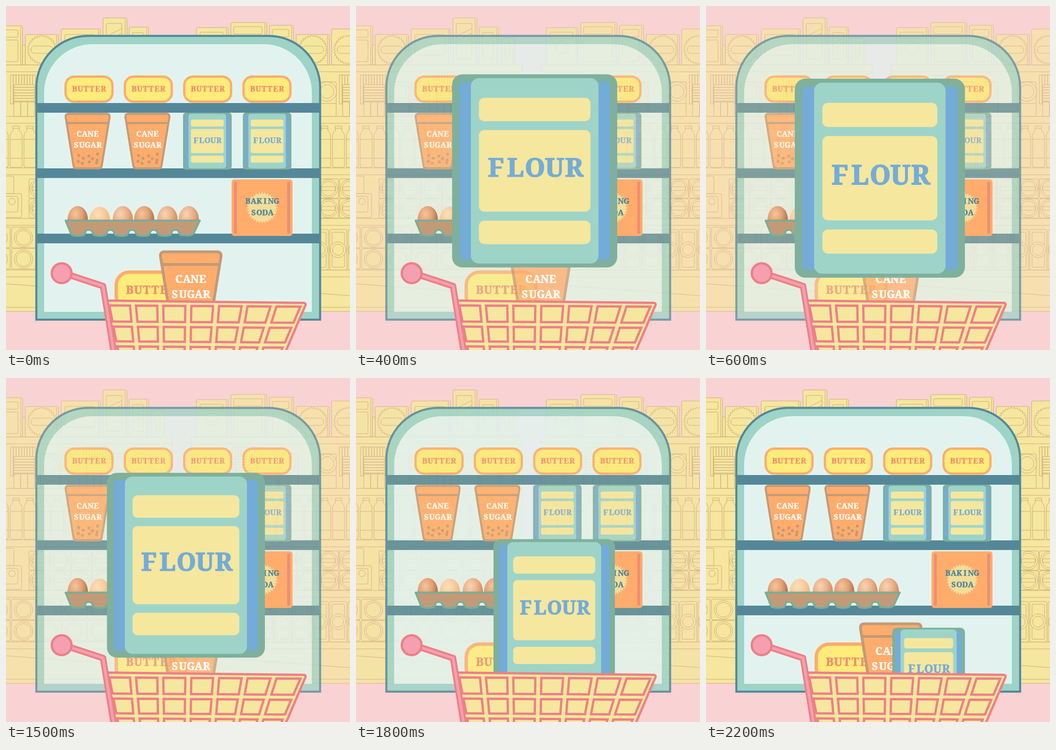
These frames come from a looping animation (748 by 748 pixels, 2400 ms). An HTML page:

```html
<!DOCTYPE html>
<html lang="en">
<head>
<meta charset="utf-8">
<title>Grocery shelf</title>
<style>
html, body { margin: 0; height: 100%; overflow: hidden; background: #f9d2d4; }
svg { display: block; width: 100vw; height: 100vh; }
text { font: bold 16.6px "Noto Serif", "Liberation Serif", serif; text-anchor: middle; stroke-width: .5; }
#back { fill: #f5e79e; stroke: #c6a072; stroke-width: .9; }
</style>
</head>
<body>
<svg id="stage" viewBox="0 0 748 748"></svg>
<script>
const rect = (x, y, w, h, r = 0, attrs = '') =>
  `<rect x="${x}" y="${y}" width="${w}" height="${h}" rx="${r}" ${attrs}/>`;
const circle = (x, y, r, attrs = '') => `<circle cx="${x}" cy="${y}" r="${r}" ${attrs}/>`;
const path = (d, attrs = '') => `<path d="${d}" ${attrs}/>`;
const group = (body, attrs) => `<g ${attrs}>${body}</g>`;
const at = (x, y, s, body) => group(body, `transform="translate(${x} ${y}) scale(${s})"`);
const range = (n, f) => Array.from({ length: n }, (_, i) => f(i)).join('');

// typewriter lettering: every letter centred on an even pitch
function text(x, y, s, color) {
  const xs = [...s].map((_, i) => x + (i - (s.length - 1) / 2) * 12.5).join(' ');
  return `<text x="${xs}" y="${y}" fill="${color}" stroke="${color}">${s}</text>`;
}

function burst(x, y, r1, r2, n, attrs = '') {
  const pts = range(n * 2, i => {
    const r = i % 2 ? r1 : r2, a = i * Math.PI / n;
    return `${(x + r * Math.cos(a)).toFixed(1)},${(y + r * Math.sin(a)).toFixed(1)} `;
  });
  return `<polygon points="${pts}" ${attrs}/>`;
}

// ---- outlined store shelves in the back ----
const box = (x, y, w) => rect(x, y, w, 128 - y, 3) + path(`M${x + w - 4} ${y + 2}V128`);
const sunBox = (x, y) => box(x, y, 72) + burst(x + 36, 95, 28, 32, 30) + rect(x + 12, 87, 48, 16, 8);
const panelBox = (x, y, w) => box(x, y, w) + rect(x + 6, y + 9, w - 16, 16, 2) + rect(x + 6, y + 31, w - 16, 90 - y, 2);
const glassBox = (x, y, w) => box(x, y, w) + rect(x + 7, y + 12, w - 18, 104 - y, 2) +
  path(`M${x + 7} ${y + 40}l${w - 18} -17M${x + 7} ${y + 50}l${w - 18} -17`);
const stack = x => range(9, i => rect(x - 7 + i * 6, 150, 6, 63)) +
  range(7, i => rect(x, 171 + i * 6, 45, 6, 1)) + range(3, i => rect(x + i * 15, 209, 15, 31, 1));
const can = x => rect(x - 20, 165, 40, 75, 3) + circle(x, 186, 21) + circle(x, 186, 15) + path(`M${x - 20} 212h40`);
const bottle = x => path(`M${x + 6} 261h14v10q6 4 6 14v62q0 4 -4 4h-18q-4 0 -4 -4v-62q0 -10 6 -14zM${x + 6} 266h14M${x} 290h26M${x} 331h26`);
const dial = x => [397, 440].map(y => rect(x - 22, y - 21, 44, 42, 3) + circle(x, y, 20) +
  circle(x, y, 16) + rect(x - 15, y - 4, 30, 8, 2)).join('');
const tins = x => [504, 550].map(y => rect(x - 26, y - 23, 52, 45, 3) + circle(x, y, 20) + circle(x, y, 16)).join('');
const carton = x => rect(x - 18, 486, 37, 88, 3) + rect(x - 13, 492, 27, 76, 2) + circle(x, 530, 17) + circle(x, 530, 12);

const bays = [[-2, 363], [403, 347]].map(([x, w]) => rect(x, 134, w, 530) +
  [128, 240, 352, 462, 574].map(y => rect(x, y, w, 15)).join('') +
  path(`M${x} 604L${x + w} 630M${x} 655h${w}`)).join('');

const back = bays +
  panelBox(-24, 43, 60) + rect(36, 85, 6, 43) + sunBox(42, 62) + box(120, 50, 85) + rect(128, 62, 65, 45, 3) +
  glassBox(211, 26, 52) + glassBox(268, 46, 42) + glassBox(317, 69, 29) +
  box(414, 47, 69) + rect(422, 57, 50, 14, 2) + circle(448, 90, 14) + panelBox(489, 36, 78) +
  panelBox(573, 42, 52) + sunBox(631, 62) + sunBox(708, 50) +
  [17, 176, 500, 732].map(stack).join('') +
  [95, 140, 245, 290, 335, 430, 475, 570, 615, 698].map(can).join('') +
  range(12, i => bottle(9 + i * 30 - 30)) + range(12, i => bottle(410 + i * 30)) +
  rect(-8, 370, 25, 38, 3) + rect(-8, 408, 42, 52, 3) + rect(-4, 414, 30, 34, 4) + circle(13, 425, 7) +
  range(7, i => dial(72 + i * 46)) + range(8, i => dial(425 + i * 46)) +
  range(7, i => tins(i * 55 - 17)) + range(9, i => carton(442 + i * 40));

// ---- products ----
const ORANGE = '#ffac6c', BROWN = '#c39a77', CREAM = '#f5e79e', TEAL = '#9ed4c8', SLATE = '#548899', CORAL = '#f08e6e';

const butter = rect(2.5, 2.5, 102, 54.5, 19, `fill="#ffec7a" stroke="${ORANGE}" stroke-width="5"`) +
  text(53.5, 34.7, 'BUTTER', CORAL);

const dots = [[31, 93], [53, 94], [72, 90], [41, 99], [61, 100], [71, 103], [30, 106], [54, 107], [39, 110], [70, 109]];
const cup = path('M9 2.5H92Q99.5 2.5 98 11L81 116Q80 121 75 121H26Q21 121 20 116L3 11Q1.5 2.5 9 2.5ZM5.5 22.5H95.5',
  `fill="${ORANGE}" stroke="${BROWN}" stroke-width="4.4"`) +
  dots.map(([x, y]) => circle(x, y, 3.2, `fill="${BROWN}"`)).join('');
const cupText = text(50.5, 51.7, 'CANE', '#fff') + text(50.5, 75.7, 'SUGAR', '#fff');

const flour = rect(0, 0, 105.5, 123.4, 6.5, 'fill="#7fb09c"') +
  rect(4.6, 4.9, 96.3, 113.7, 2.5, 'fill="#74acd8"') +
  rect(12, 2.5, 81.5, 118.4, 5, `fill="${TEAL}"`) +
  [[15, 15], [35.6, 52.2], [93.5, 15]].map(([y, h]) => rect(17.1, y, 71.3, h, 3.5, `fill="${CREAM}"`)).join('') +
  text(53, 65.5, 'FLOUR', '#74acd8');

const arch = (l, t, r, b, c) => `M${l} ${b}V${t + c}A${c} ${c} 0 0 1 ${l + c} ${t}H${r - c}A${c} ${c} 0 0 1 ${r} ${t + c}V${b}Z`;
const fridge = path(arch(66, 65, 683, 682, 112), `fill="${TEAL}" stroke="${SLATE}" stroke-width="4.5"`) +
  path(arch(83, 83, 665, 665, 105), 'fill="#e2f3ef"') +
  [211, 353, 495].map(y => rect(64, y, 621, 21, 0, `fill="${SLATE}"`)).join('') +
  range(4, i => at(127 + i * 129, 151, 1, butter)) +
  range(2, i => at(127 + i * 130, 232, 1, cup + cupText) + at(385 + i * 130, 232, 1, flour));

const shells = [['#f6c49a', '#e2a074', '#a9653f'], ['#fde0bb', '#fbcb9b', '#efb07c'], ['#f9d4b5', '#ebb088', '#c98458']];
const shades = shells.map((c, i) => `<radialGradient id="shell${i}" cx=".38" cy=".3" r=".7">` +
  c.map((color, j) => `<stop offset="${j / 2}" stop-color="${color}"/>`).join('') + '</radialGradient>').join('');
const eggs = [[156, 0], [204, 1], [254, 2], [300.5, 0], [351, 2], [397.5, 2]].map(([x, s]) =>
  `<ellipse cx="${x}" cy="464" rx="22" ry="${s == 1 ? 27.5 : 29}" fill="url(#shell${s})"/>`).join('');
const tray = path(`M129.5 466.5H421.5L408 495Q403 499 396 499L379 498` +
  range(5, () => 'l-5 -9q-1 -2 -4 -2h-4q-3 0 -4 2l-4 9q-13 4 -26 0') + 'Q141 497 140 492Z',
  `fill="${BROWN}" stroke="#74b097" stroke-width="4" stroke-linejoin="round"`);
const soda = rect(490.5, 377, 132.5, 123, 6, `fill="${ORANGE}"`) +
  rect(495.5, 382, 6.5, 113, 1, `fill="${CORAL}"`) + rect(611.5, 382, 6.5, 113, 1, `fill="${CORAL}"`) +
  burst(557, 438.5, 29, 34.5, 32, 'fill="#f2dd9a"') +
  text(557, 430, 'BAKING', '#4e8498') + text(557, 455, 'SODA', '#4e8498');

// ---- cart ----
const PINK = '#ee7f86', ROSE = '#f4a0b0';
const barsTop = [218, 276, 335.5, 396.5, 457, 519, 582, 647], barsLow = [235, 284, 337, 395, 450, 503, 554, 609];
const barX = (i, y) => barsTop[i] + (barsLow[i] - barsTop[i]) * (y - 650) / 88;
function cell(i, y1, y2) {
  const p = (k, y, d) => `${(barX(k, y) + d).toFixed(1)} ${(y + k * .4).toFixed(1)}`;
  return path(`M${p(i, y1, 6.5)}L${p(i + 1, y1, -6.5)}L${p(i + 1, y2, -6.5)}L${p(i, y2, 6.5)}Z`);
}
const handle = 'M138 585L211 609L238 775';
const cart = group(
  path('M218 640.5L647 645.5Q653 646 651 651L600 770H238Z', 'stroke-linejoin="round"') +
  [[651, 686], [697, 729], [740, 775]].map(([a, b]) => range(7, i => cell(i, a, b))).join(''),
  `fill="${CREAM}" stroke="${PINK}" stroke-width="5"`) +
  path(handle, `fill="none" stroke="${PINK}" stroke-width="14" stroke-linejoin="round"`) +
  path(handle, `fill="none" stroke="${ROSE}" stroke-width="6"`) +
  circle(121, 581, 21.5, `fill="${ROSE}" stroke="${PINK}" stroke-width="5"`);

const stage = document.getElementById('stage');
stage.innerHTML = `<defs>${shades}</defs>` + rect(0, 0, 748, 748, 0, 'fill="#f9d2d4"') +
  group(back, 'id="back"') + group(fridge, 'class="fade"') + eggs + tray + soda +
  group(at(236, 575, 1.48, butter), 'class="fade"') +
  group(at(332, 531, 1.38, cup), 'class="fade"') + at(332, 531, 1.38, cupText) +
  group(flour, 'id="pack"') + cart;

// ---- motion: step, x, y, width, fade ----
const keys = [[0, 385, 232, 105.5, 0], [4, 209, 148.5, 359, .9], [6, 193, 158, 370, 1],
  [14, 193, 158, 370, 1], [22, 405, 543, 158, 0], [24, 405, 543, 158, 0]];
const pack = document.getElementById('pack'), backdrop = document.getElementById('back');
const fading = document.querySelectorAll('.fade');

function draw(now) {
  const step = Math.floor(now % 2400 / 100);
  const n = keys.findIndex(k => k[0] > step), a = keys[n - 1], b = keys[n];
  const u = (step - a[0]) / (b[0] - a[0]);
  const [, x, y, w, fade] = a.map((v, i) => v + (b[i] - v) * u);
  pack.setAttribute('transform', `translate(${x} ${y}) scale(${w / 105.5})`);
  backdrop.setAttribute('opacity', 1 - .32 * fade);
  fading.forEach(el => el.setAttribute('opacity', 1 - .27 * fade));
}

const start = performance.now();
function loop() {
  draw(performance.now() - start);
  requestAnimationFrame(loop);
}
loop();
</script>
</body>
</html>
```
